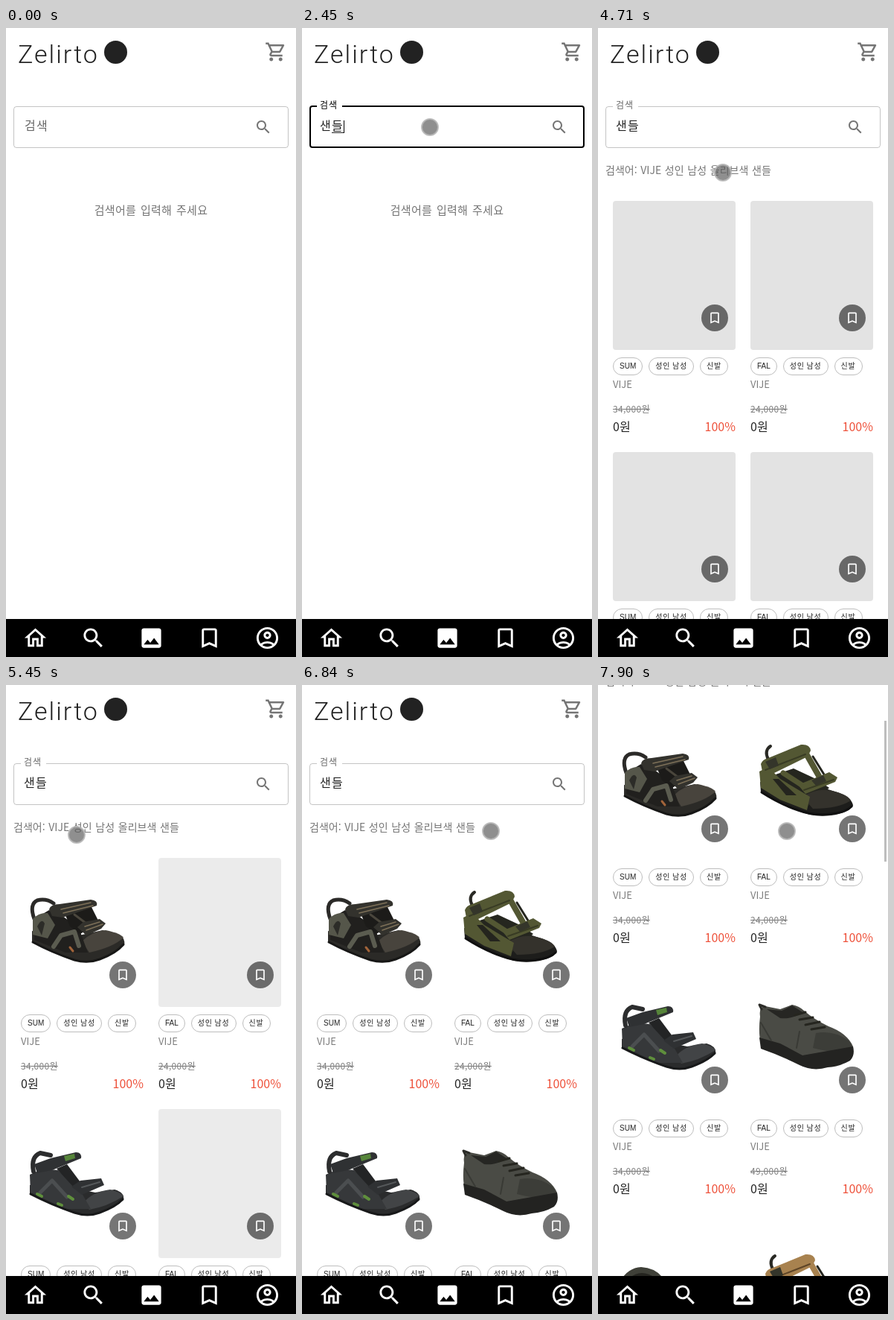
Animation, 390 px wide and 844 px high, one loop 8000 ms. Source, as an HTML page:

```html
<!DOCTYPE html>
<html lang="ko">
<head>
<meta charset="utf-8">
<title>검색</title>
<style>
html, body { margin: 0; width: 100%; height: 100%; overflow: hidden; background: #fff; }
#stage { position: absolute; left: 0; top: 0; width: 390px; height: 844px; overflow: hidden; background: #fff;
  font: 16px/20px "Liberation Sans", Arial, sans-serif; color: rgba(0,0,0,.87); }
#stage * { box-sizing: border-box; }
#page { position: absolute; inset: 0; }
.abs, svg { position: absolute; white-space: nowrap; }
i { font-style: normal; font-family: "Noto Sans CJK KR", "Noto Sans CJK", sans-serif; letter-spacing: .08em; line-height: 0; }
.noto { font-family: "Noto Sans CJK KR", "Noto Sans CJK", sans-serif; }
.thin { font-weight: 300; }
#logo { left: 16px; top: 15px; font: 300 34px/40px Roboto, sans-serif; letter-spacing: 2px; color: #222; }
#mark { left: 132px; top: 17px; width: 31px; height: 31px; border-radius: 50%; background: #222; }
#field { left: 10px; top: 105px; width: 370px; height: 56px; border: 1px solid rgba(0,0,0,.23); border-radius: 4px; }
#field.focus { top: 104px; height: 57px; border: 2px solid #000; }
#notch { left: 20px; top: 103px; height: 4px; background: #fff; }
#label { left: 0; top: 0; transform-origin: 0 50%; }
#value { left: 24px; top: 122px; }
#under { top: 140px; width: 16px; height: 1px; background: #222; }
#caret { top: 124px; width: 1px; height: 17px; background: #000; }
#hint { left: 0; width: 390px; top: 234px; text-align: center; font-size: 15px; letter-spacing: .3px; word-spacing: 1.3px; color: #757575; }
#list { left: 10px; top: 162px; width: 370px; background: #fff; }
#list div { height: 72px; padding-left: 16px; line-height: 69px; border: 1px solid #dcdcdc; }
#query { left: 10px; top: 180px; font-size: 14px; word-spacing: .8px; color: #757575; }
.card { position: absolute; width: 165px; height: 320px; }
.bone { left: 0; top: 0; width: 165px; height: 200px; border-radius: 4px; background: #e3e3e3; }
.save { left: 119px; top: 139px; width: 36px; height: 36px; border-radius: 50%; background: rgba(0,0,0,.54); }
.chips { left: 0; top: 210px; display: flex; gap: 8px; }
.chips span { height: 24px; padding: 0 8px; border: 1px solid #bdbdbd; border-radius: 12px; font-size: 10px; line-height: 22px; }
.brand { left: 0; top: 236px; font-size: 13px; color: #7c7c7c; }
.price { left: 0; top: 269px; font-size: 12px; letter-spacing: .3px; color: #7c7c7c; text-decoration: line-through; }
.cost { left: 0; top: 292px; }
.off { right: 0; top: 292px; color: #ee5039; }
#bar { left: 385px; width: 3px; height: 189px; background: #bdbdbd; }
#nav { left: 0; top: 793px; width: 390px; height: 51px; background: #000; }
</style>
</head>
<body>
<div id="stage"></div>
<script>
const LOOP = 8000;
const BRAND = 'VIJE';
const PICK = BRAND + ' 성인 남성 올리브색 샌들';
const ITEMS = [PICK, 'Yemu 성인 남성 빨강 샌들', 'Forbeldane 남자 아이 파랑 샌들',
  'Pelfo 성인 남성 회색 샌들', 'Dulnek 남자 아이 검정 샌들'];

const ICON = {
  cart: 'M15.55 13c.75 0 1.41-.41 1.75-1.03l3.58-6.49c.37-.66-.11-1.48-.87-1.48H5.21l-.94-2H1v2h2l3.6 7.59-1.35 2.44C4.52 15.37 5.48 17 7 17h12v-2H7l1.1-2h7.45zM6.16 6h12.15l-2.76 5H8.53L6.16 6zM7 18c-1.1 0-1.99.9-1.99 2S5.9 22 7 22s2-.9 2-2-.9-2-2-2zm10 0c-1.1 0-1.99.9-1.99 2s.89 2 1.99 2 2-.9 2-2-.9-2-2-2z',
  search: 'M15.5 14h-.79l-.28-.27C15.41 12.59 16 11.11 16 9.5 16 5.91 13.09 3 9.5 3S3 5.91 3 9.5 5.91 16 9.5 16c1.61 0 3.09-.59 4.23-1.57l.27.28v.79l5 4.99L20.49 19l-4.99-5zm-6 0C7.01 14 5 11.99 5 9.5S7.01 5 9.5 5 14 7.01 14 9.5 11.99 14 9.5 14z',
  home: 'M12 5.69l5 4.5V18h-2v-6H9v6H7v-7.81l5-4.5M12 3 2 12h3v8h6v-6h2v6h6v-8h3L12 3z',
  image: 'M21 19V5c0-1.1-.9-2-2-2H5c-1.1 0-2 .9-2 2v14c0 1.1.9 2 2 2h14c1.1 0 2-.9 2-2zM8.5 13.5l2.5 3.01L14.5 12l4.5 6H5l3.5-4.5z',
  mark: 'M17 3H7c-1.1 0-1.99.9-1.99 2L5 21l7-3 7 3V5c0-1.1-.9-2-2-2zm0 15-5-2.18L7 18V5h10v13z',
  user: 'M12 2C6.48 2 2 6.48 2 12s4.48 10 10 10 10-4.48 10-10S17.52 2 12 2zM7.35 18.5C8.66 17.56 10.26 17 12 17s3.34.56 4.65 1.5c-1.31.94-2.91 1.5-4.65 1.5s-3.34-.56-4.65-1.5zm10.79-1.38C16.45 15.8 14.32 15 12 15s-4.45.8-6.14 2.12C4.7 15.73 4 13.95 4 12c0-4.42 3.58-8 8-8s8 3.58 8 8c0 1.95-.7 3.73-1.86 5.12zM12 6c-1.93 0-3.5 1.57-3.5 3.5S10.07 13 12 13s3.5-1.57 3.5-3.5S13.93 6 12 6zm0 5c-.83 0-1.5-.67-1.5-1.5S11.17 8 12 8s1.5.67 1.5 1.5S12.83 11 12 11z'
};
const icon = (name, x, y, size, fill) =>
  `<svg style="left:${x}px;top:${y}px" width="${size}" height="${size}" viewBox="0 0 24 24" fill="${fill}"><path d="${ICON[name]}"/></svg>`;
const ko = s => s.replace(/[ㄱ-ㅎ가-힣]+/g, '<i>$&</i>');
const fill = (d, c) => `<path d="${d}" fill="${c}"/>`;
const line = (d, c, w) => `<path d="${d}" fill="none" stroke="${c}" stroke-width="${w}" stroke-linejoin="round" stroke-linecap="round"/>`;

// Shoe drawings inside a 165 x 200 picture
const closedSandal = () =>
  fill('M15 98L15 113Q40 126 70 136Q88 143 104 137Q128 128 139 117Q141 108 132 103L110 97L60 108Z', '#2b2a27') +
  fill('M82 112Q96 98 114 97Q134 101 138 107Q124 120 92 127Z', '#48443d') +
  fill('M18 82L38 70L56 78L78 94L90 127L60 127L18 110Z', '#21201e') +
  fill('M58 72L94 64L105 86L80 102L66 92Z', '#1c1b19') +
  line('M72 76L88 88', '#4a463c', 3) +
  line('M18 82Q11 62 22 57Q34 54 44 61', '#2b2a28', 5) +
  fill('M16 82Q24 73 36 74L46 90L36 108L16 103Z', '#55564a') +
  fill('M22 92Q28 80 32 88L28 104Z', '#2c2c28') +
  line('M44 119L54 104L72 99L78 118', '#5b5c50', 6) +
  fill('M38 69Q40 62 52 62L94 56Q104 57 102 64L56 80L42 78Z', '#33322d') +
  line('M54 69L94 60M57 74L97 64', '#7d7058', 1.5) +
  fill('M76 93L84 86L106 82L114 88L108 95L88 104Z', '#33322d') +
  line('M86 92L106 86M88 97L110 89', '#7d7058', 1.5) +
  line('M16 113Q42 127 72 137Q90 142 106 136Q128 128 138 116', '#171716', 3) +
  line('M66 120L70 125', '#a2643a', 3);

const hookSandal = () =>
  fill('M12 102L12 114Q40 128 70 138Q88 146 104 140Q128 131 138 122Q140 112 126 108L100 112L40 100Z', '#2a2b2c') +
  fill('M84 126Q96 111 120 108Q136 112 138 117Q116 131 92 135Z', '#424446') +
  fill('M12 88L30 80L50 82L78 106L94 134L60 134L13 112Z', '#36383a') +
  fill('M48 80L62 74L80 98L72 106Z', '#232425') +
  line('M17 84Q13 64 26 59L40 62', '#2c2d2e', 6) +
  line('M26 112L42 96L62 118', '#4b4e50', 5) +
  fill('M18 74L40 66L74 58Q82 58 81 66L42 82L22 86Z', '#2f3133') +
  fill('M58 63L72 60L73 66L60 70Z', '#56853a') +
  fill('M68 104L80 96L108 93L112 102L82 115Z', '#2f3133') +
  line('M82 105L106 98', '#55585a', 2) +
  line('M13 114Q42 129 72 139Q90 145 106 139Q128 131 137 121', '#18191a', 3) +
  line('M22 114L28 117M50 127L55 129M64 117L70 121', '#5f8f3c', 4);

const openSandal = (strap, edge) =>
  fill('M13 94L14 108Q34 122 62 132Q84 142 108 139Q132 136 138 126Q137 116 120 109L98 102L40 98Z', '#1d1d1b') +
  fill('M34 84L58 76L88 90L106 102L78 126L44 112Z', '#25261f') +
  fill('M70 114Q92 100 114 107Q132 112 135 119Q118 130 84 130Z', '#34322c') +
  line('M24 64Q18 52 27 46', '#292924', 4) +
  fill('M12 80L24 74L40 90L80 114L76 132L40 118L14 102Z', strap) +
  fill('M30 90L38 90L62 112L48 112Z', '#24241e') +
  line('M76 58L92 86', strap, 8) +
  line('M84 60L99 84', '#25261f', 3) +
  line('M44 82L78 104', strap, 7) +
  fill('M14 70Q16 64 24 62L68 44Q80 43 81 52L77 60L30 83L16 80Z', strap) +
  line('M20 78L74 57', edge, 2) +
  fill('M20 67L34 61L38 72L26 77Z', '#34352a') +
  fill('M64 98L106 81L117 88L114 94L74 110Z', strap) +
  line('M72 105L112 91', edge, 2) +
  fill('M82 92L98 85L102 93L88 99Z', '#34352a') +
  line('M15 108Q40 124 64 132Q86 140 108 137Q128 135 136 127', '#101010', 3);

const sneaker = () =>
  fill('M13 72Q11 58 20 58L40 62L56 56Q66 58 72 64Q86 76 105 85Q130 94 138 112L134 128L84 134L15 112Q10 96 13 72Z', '#4a4b45') +
  fill('M22 62L42 64L56 57L70 66Q56 76 40 74Z', '#262623') +
  fill('M88 94Q112 90 132 104Q138 112 136 116Q112 122 84 114Z', '#3c3d38') +
  fill('M12 100L40 108L70 124Q104 118 138 112Q141 124 134 131Q120 139 104 140Q84 146 66 137Q40 124 14 115Z', '#232321') +
  line('M14 80L28 104M66 92L62 114', '#393a35', 2) +
  line('M60 70L74 66M66 76L84 73M74 83L93 79M82 89L100 86', '#25251f', 3) +
  line('M15 62L12 56L20 59', '#2c2c28', 3);

const clog = () =>
  fill('M10 90Q20 72 38 71Q56 72 66 84L128 108Q140 124 100 140L20 118Z', '#3f4038') +
  fill('M22 86Q38 72 58 86Z', '#24241f');

// season, price, load time, picture
const SHOES = [
  ['SUM', '34,000', 5250, closedSandal()],
  ['FAL', '24,000', 5900, openSandal('#535733', '#383b24')],
  ['SUM', '34,000', 5350, hookSandal()],
  ['FAL', '49,000', 6560, sneaker()],
  ['SUM', '34,000', 5700, clog()],
  ['FAL', '24,000', 6700, `<g transform="translate(6 10)">${openSandal('#a8824f', '#5d4426')}</g>`]
];
const card = ([season, price, , art], i) => `
  <div class="card" style="left:${20 + i % 2 * 185}px;top:${232 + (i >> 1) * 337}px">
    <div class="abs bone"></div>
    <svg class="photo" style="left:0;top:0" width="165" height="200">${art}</svg>
    <div class="abs save">${icon('mark', 8, 8, 20, '#fff')}</div>
    <div class="abs chips">${[season, '성인 남성', '신발'].map(s => `<span>${ko(s)}</span>`).join('')}</div>
    <div class="abs noto thin brand">${BRAND}</div>
    <div class="abs noto thin price">${price}원</div>
    <div class="abs noto thin cost">0원</div>
    <div class="abs noto thin off">100%</div>
  </div>`;

const $ = id => document.getElementById(id);
$('stage').innerHTML = `
  <div id="page">
    <div class="abs" id="logo">Zelirto</div><div class="abs" id="mark"></div>
    ${icon('cart', 348, 17, 30, '#757575')}
    <div class="abs" id="field"></div><div class="abs" id="notch"></div>
    <div class="abs" id="label">${ko('검색')}</div>
    <div class="abs" id="value"></div><div class="abs" id="under"></div><div class="abs" id="caret"></div>
    ${icon('search', 334, 121, 24, '#757575')}
    <div class="abs noto" id="hint">검색어를 입력해 주세요</div>
    <div class="abs noto" id="query">검색어: ${PICK}</div>
    <div id="cards">${SHOES.map(card).join('')}</div>
    <div class="abs" id="list">${ITEMS.map(s => `<div>${ko(s)}</div>`).join('')}</div>
  </div>
  <div class="abs" id="bar"></div>
  <div class="abs" id="nav">${['home', 'search', 'image', 'mark', 'user'].map((n, i) => icon(n, 22 + i * 78, 8, 35, '#fff')).join('')}</div>
  <svg id="cursor" style="left:0;top:0" width="30" height="30">
    <circle id="ring" cx="15" cy="15" r="11" stroke-width="2"/><circle id="core" cx="15" cy="15" r="8"/>
  </svg>`;

const bones = [...document.querySelectorAll('.bone')];
const photos = [...document.querySelectorAll('.photo')];

const MOVES = [[270, 308, 671], [480, 259, 448], [690, 228, 150], [830, 192, 98], [950, 172, 133],
  [3460, 172, 133], [3860, 168, 194], [5120, 168, 194], [5450, 95, 201], [5600, 88, 201],
  [5900, 98, 199], [6030, 102, 198], [6230, 126, 196], [6770, 251, 196], [6840, 254, 196]];
const SCROLL = [[7569, 0], [7570, 84], [7900, 196]];
const TYPED = [[0, ''], [1720, 'ㅅ'], [1920, '새'], [2050, '샌'], [2180, '샌ㄷ'], [2310, '샌드'], [2450, '샌들']];
const CARET = [[1050, 1580], [1720, 2980], [3520, 4060]];

const within = (t, a, b) => t >= a && t < b;
const show = (el, on) => { el.style.visibility = on ? 'visible' : 'hidden'; };

function tween(t, keys) {
  if (t <= keys[0][0]) return keys[0].slice(1);
  const n = keys.findIndex(k => k[0] > t);
  if (n < 0) return keys[keys.length - 1].slice(1);
  const a = keys[n - 1], b = keys[n], p = (t - a[0]) / (b[0] - a[0]);
  return a.slice(1).map((v, i) => v + (b[i + 1] - v) * p);
}

function drawField(t) {
  const focus = within(t, 980, 4470);
  const p = Math.min(1, Math.max(0, (t - 1050) / 190));
  const e = 1 - (1 - p) ** 2;
  $('field').classList.toggle('focus', focus);
  $('notch').style.width = 34 * e + 'px';
  $('label').style.transform = `translate(${25 - e}px,${122 - 27.5 * e}px) scale(${1 - e / 4})`;
  $('label').style.color = focus && t > 1050 ? '#000' : 'rgba(0,0,0,.6)';
  const text = TYPED.filter(k => k[0] <= t).pop()[1];
  $('value').innerHTML = ko(text);
  $('caret').style.left = 24 + 16 * text.length + 'px';
  show($('caret'), CARET.some(c => within(t, ...c)));
  $('under').style.left = 8 + 16 * text.length + 'px';
  show($('under'), within(t, 1720, 2980));
}

function drawResults(t) {
  show($('hint'), t < 4400);
  show($('list'), within(t, 3020, 4470));
  show($('query'), t >= 4470);
  $('cards').style.display = t >= 4600 ? '' : 'none';
  const pulse = .7 + .3 * Math.cos(1.55 + (Math.max(t, 5180) - 5450) * Math.PI / 750);
  SHOES.forEach((s, i) => {
    const ready = t >= s[2];
    bones[i].style.opacity = ready ? 0 : pulse;
    show(photos[i], ready);
  });
}

function drawCursor(t) {
  const [x, y] = tween(t, MOVES);
  const press = within(t, 920, 1040) || within(t, 4320, 4530);
  show($('cursor'), t >= 270);
  $('cursor').style.transform = `translate(${x - 15}px,${y - 15}px)`;
  $('ring').setAttribute('fill', press ? 'rgba(196,196,10,.8)' : 'rgba(90,90,90,.68)');
  $('ring').setAttribute('stroke', press ? 'rgba(200,200,40,.8)' : 'rgba(185,185,185,.85)');
  $('core').setAttribute('fill', press ? 'rgba(120,120,10,.3)' : 'none');
}

function draw(t) {
  drawField(t);
  drawResults(t);
  drawCursor(t);
  const [s] = tween(t, SCROLL);
  $('page').style.transform = s ? `translateY(${-Math.round(s)}px)` : 'none';
  $('bar').style.top = 2.5 + s * .232 + 'px';
  show($('bar'), t >= 7570);
}

const start = performance.now();
function tick() {
  draw((performance.now() - start) % LOOP);
  requestAnimationFrame(tick);
}
tick();
</script>
</body>
</html>
```
